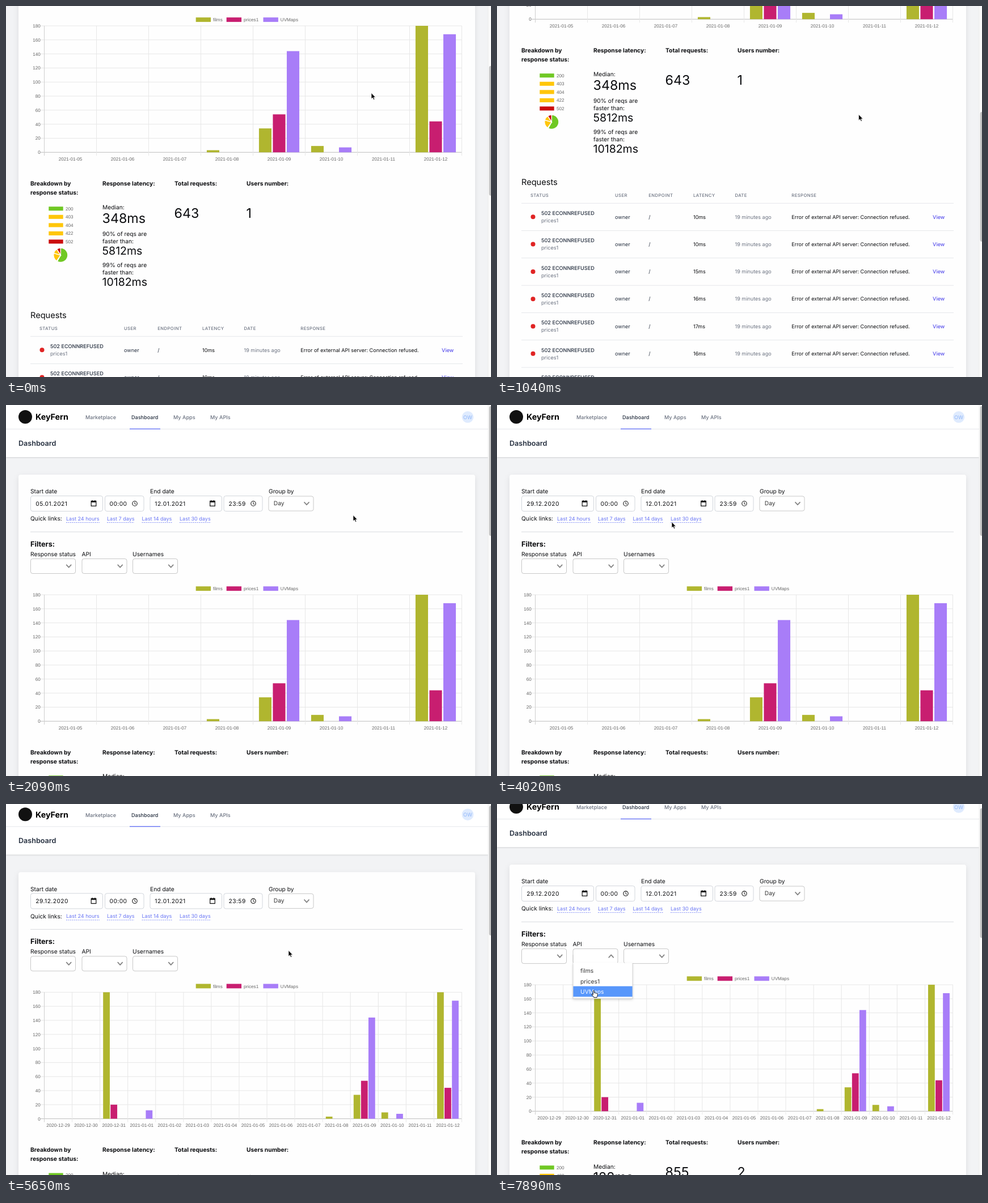
These frames come from a looping animation (855 px wide and 655 px high, 8000 ms). An HTML page:

```html
<!DOCTYPE html>
<html lang="en">
<head>
<meta charset="utf-8">
<title>Dashboard</title>
<style>
html, body { margin: 0; width: 100%; height: 100%; overflow: hidden; background: #f2f3f5; }
svg { display: block; width: 855px; height: 655px; }
text { font-family: Inter, "Open Sans", sans-serif; white-space: pre; text-rendering: geometricPrecision; }
.chart text { font-family: "Liberation Sans", Arial, sans-serif; }
.bar { filter: drop-shadow(0 1px 1px rgba(0,0,0,.14)); }
.card { filter: drop-shadow(0 3px 5px rgba(0,0,0,.09)); }
.menu { filter: drop-shadow(0 2px 2px rgba(0,0,0,.15)); }
</style>
</head>
<body>
<svg id="stage" viewBox="0 0 855 655"></svg>
<script>
const TICK = 148.4, LOOP = 8000;
const INK = '#0b0c0f', DARK = '#252f3f', GRAY = '#6b7280', LINK = '#6875f5', LINE = '#e5e7eb';
const COLORS = ['#b0b62f', '#c81e70', '#a87df8'];
const NAMES = ['films', 'prices1', 'UVMaps'];
const BASE = 10.25, SMALL = 9.05, TINY = 8.15, BIG = 23.3, MID = 19.5;

// y is the middle of the capitals
function text(x, y, s, size = BASE, fill = INK, weight = 400, extra = '') {
  return `<text x="${x}" y="${(y + size * .364).toFixed(2)}" font-size="${size}" fill="${fill}" font-weight="${weight}" ${extra}>${s}</text>`;
}
function rect(x, y, w, h, fill, extra = '') {
  return `<rect x="${x}" y="${y}" width="${w}" height="${h}" fill="${fill}" ${extra}/>`;
}
function line(x1, y1, x2, y2, stroke = LINE, extra = '') {
  return `<path d="M${x1} ${y1}L${x2} ${y2}" stroke="${stroke}" fill="none" ${extra}/>`;
}
function field(x, y, w, h, stroke = '#d2d6dc') {
  return rect(x, y, w, h, '#fff', `rx="3.5" stroke="${stroke}"`);
}
function chevron(x, y, id = '') {
  return `<path ${id} transform="translate(${x} ${y})" d="M-4-2.2L0 2.2L4-2.2" fill="none" stroke="#868686" stroke-width="1.8" stroke-linecap="round" stroke-linejoin="round"/>`;
}
function calendar(x, y) {
  return `<g transform="translate(${x} ${y})"><path d="M-4.3-3.8H4.3V4.8H-4.3Z" fill="none" stroke="#111" stroke-width="1.2"/>`
    + rect(-4.5, -4.2, 9, 2.6, '#111') + rect(-3, -5.4, 1.3, 2, '#111') + rect(1.7, -5.4, 1.3, 2, '#111') + '</g>';
}
function clock(x, y) {
  return `<g transform="translate(${x} ${y})" fill="none" stroke="#111"><circle r="4.2" stroke-width="1.1"/><path d="M0-2.6V.3L2 1.5"/></g>`;
}

function header() {
  const nav = [[140, 'Marketplace'], [221, 'Dashboard'], [295, 'My Apps'], [360, 'My APIs']];
  return rect(0, -1, 850, 93, '#fff', 'class="bar"')
    + line(0, 42.5, 850, 42.5)
    + '<circle cx="34" cy="21" r="12" fill="#111"/>'
    + text(52, 21, 'KeyFern', 14.3, '#000', 700)
    + nav.map(([x, s]) => text(x, 22, s, 9.08, s === 'Dashboard' ? DARK : GRAY, 500)).join('')
    + rect(218, 41.6, 54, 1.4, LINK)
    + '<circle cx="814" cy="21.3" r="10.3" fill="#dfebfe"/>'
    + text(814, 21.5, 'OW', SMALL, '#8fb5f8', 400, 'text-anchor="middle"')
    + text(22, 67.5, 'Dashboard', 12.6, DARK, 600);
}

function form() {
  const pick = 'rgba(60,60,60,.28)';
  const links = [[106, 165, '24 hours'], [178, 226, '7 days'], [239.5, 293, '14 days'], [306, 361, '30 days']];
  const filters = [[43, 'Response status'], [133.5, 'API'], [223, 'Usernames']];
  const value = (x, s, id = '') => text(x, 174, s, BASE, INK, 400, 'letter-spacing=".44" ' + id);
  return text(43, 152.5, 'Start date') + text(254, 152.5, 'End date') + text(463, 152.5, 'Group by')
    + field(43.5, 160.5, 127, 27) + field(174.5, 160.5, 68.5, 27)
    + field(254, 160.5, 126.5, 27) + field(384, 160.5, 68, 27)
    + value(52.3, '', 'id="start"') + value(182.5, '00:00') + value(262.3, '12.01.2021') + value(392.5, '23:59')
    + calendar(154.5, 173.5) + clock(227, 174) + calendar(364, 173.5) + clock(436, 174)
    + field(463, 161, 79, 26, pick) + text(471.8, 173, 'Day', BASE, '#333') + chevron(530, 174)
    + text(43, 200.5, 'Quick links:')
    + links.map(([a, b, s]) => text(a, 200.8, 'Last ' + s, SMALL, LINK)
      + line(a, 207.5, b, 207.5, LINK, 'stroke-dasharray="2 1.4" stroke-width=".8"')).join('')
    + line(43, 224, 805, 224, '#d8dade')
    + text(43, 245, 'Filters:', 12.7, INK, 700)
    + filters.map(([x, s], i) => text(x, 263, s) + field(x + .5, 271.5, 79, 26, pick)
      + chevron(x + 67.7, 284.5, i === 1 ? 'id="chev"' : '')).join('');
}

const LEFT = 67.5, WIDE = 736, TOP = 335, ZERO = 558.3;
const yOf = v => ZERO - v * (ZERO - TOP) / 180;
const week = { first: Date.UTC(2021, 0, 5), n: 8,
  data: { 3: [3, 0, 0], 4: [34, 54, 144], 5: [9, 0, 7], 7: [180, 44, 168] } };
const fortnight = { first: Date.UTC(2020, 11, 29), n: 15,
  data: { 2: [180, 20, 0], 3: [0, 0, 12], 10: [3, 0, 0], 11: [34, 54, 144], 12: [9, 0, 7], 14: [180, 44, 168] } };

function axes(set, id) {
  const step = WIDE / set.n;
  let out = '';
  for (let i = 0; i <= set.n; i++) {
    const x = LEFT + i * step;
    out += line(x, TOP, x, ZERO + 6, i ? '#e7e7e7' : '#cfcfcf');
    if (i < set.n) {
      const day = new Date(set.first + i * 864e5).toISOString().slice(0, 10);
      out += text((x + step / 2).toFixed(2), 569.8, day, TINY, '#666', 400, 'text-anchor="middle"');
    }
  }
  return `<g id="${id}">${out}</g>`;
}
function chart() {
  let out = '';
  [334.7, 388.7, 453.5].forEach((x, i) => {
    out += rect(x, 320.2, 26.4, 7.9, COLORS[i]) + text(x + 30.3, 324.2, NAMES[i], TINY, '#666');
  });
  for (let v = 0; v <= 180; v += 20) {
    out += line(61, yOf(v), LEFT + WIDE, yOf(v), v ? '#e7e7e7' : '#bdbdbd')
      + text(60.7, yOf(v), v, TINY, '#666', 400, 'text-anchor="end"');
  }
  return `<g class="chart">${out}${axes(week, 'week')}${axes(fortnight, 'fortnight')}<g id="bars"></g></g>`;
}

function barAt(set, i, s) {
  const step = WIDE / set.n, slot = step * .8 / 3;
  return { x: LEFT + (i + .5) * step + (s - 1) * slot, w: slot * .9, v: (set.data[i] || [0, 0, 0])[s] };
}
function bars(p) {
  let out = '';
  for (let i = 0; i < 15; i++) for (let s = 0; s < 3; s++) {
    const b = barAt(fortnight, i, s);
    const a = i < 8 ? barAt(week, i, s) : { ...b, v: 0 };
    const mix = key => a[key] + (b[key] - a[key]) * p;
    const v = mix('v'), w = mix('w');
    if (v > .01) out += rect((mix('x') - w / 2).toFixed(2), yOf(v).toFixed(2), w.toFixed(2), (ZERO - yOf(v)).toFixed(2), COLORS[s]);
  }
  return out;
}

function pie(cx, cy, r) {
  const parts = [[.58, '#70c824'], [.015, '#ffc60a'], [.2, '#ffc60a'], [.115, '#ffc60a'], [.09, '#cb0d0d']];
  let at = 0;
  const point = f => `${(cx + r * Math.sin(f * 2 * Math.PI)).toFixed(2)} ${(cy - r * Math.cos(f * 2 * Math.PI)).toFixed(2)}`;
  return parts.map(([f, c]) => {
    const d = `M${cx} ${cy}L${point(at)}A${r} ${r} 0 ${f > .5 ? 1 : 0} 1 ${point(at += f)}Z`;
    return `<path d="${d}" fill="${c}" stroke="#fff" stroke-width="1.3"/>`;
  }).join('');
}
function stats() {
  const codes = [200, 403, 404, 422, 502];
  const heads = [[43, 613, 'Breakdown by'], [43, 629, 'response status:'], [170, 613, 'Response latency:'],
    [297, 613, 'Total requests:'], [424, 613, 'Users number:']];
  return heads.map(([x, y, s]) => text(x, y, s, 10.3, INK, 700)).join('')
    + '<g class="chart">' + codes.map((c, i) => {
      const y = 657.8 + i * 14.55;
      return rect(75.3, y - 3.6, 25.4, 7.1, i ? i < 4 ? '#ffc60a' : '#cb0d0d' : '#70c824')
        + text(105, y, c, TINY, '#666', 400, i === 1 ? 'id="code"' : '');
    }).join('') + '</g>' + pie(96.3, 739.8, 12.6)
    + text(170, 655.7, 'Median:') + text(169.5, 674.3, '', BIG, INK, 400, 'id="median"')
    + text(170, 702, '90% of reqs are') + text(170, 715.2, 'faster than:') + text(169.5, 731.4, '5812ms', MID)
    + text(170, 757.5, '99% of reqs are') + text(170, 770.7, 'faster than:') + text(169.5, 786.8, '10182ms', MID)
    + text(296.5, 665.7, '', BIG, INK, 400, 'id="total"') + text(423.5, 665.7, '', BIG, INK, 400, 'id="users"');
}

function table() {
  const cols = [[59, 'STATUS'], [208, 'USER'], [267.3, 'ENDPOINT'], [346, 'LATENCY'], [419.5, 'DATE'], [519.3, 'RESPONSE']];
  let out = text(43, 845.3, 'Requests', 14.6)
    + cols.map(([x, s]) => text(x, 869.6, s, 7.73, GRAY, 500, 'letter-spacing=".39"')).join('')
    + line(43, 883.3, 805, 883.3);
  [10, 10, 15, 16, 17, 16, 15].forEach((ms, i) => {
    const y = 907.3 + i * 48.3;
    out += `<circle cx="63.5" cy="${y}" r="4" fill="#e02424"/>`
      + text(78, y - 6.5, '502 ECONNREFUSED', 9.12, DARK, 500) + text(78, y + 6.6, NAMES[1], SMALL, GRAY)
      + text(208, y, 'owner', SMALL, DARK) + text(267.3, y, '/', SMALL, DARK)
      + text(346, y, ms + 'ms', SMALL) + text(419.5, y, '19 minutes ago', SMALL, GRAY)
      + text(519.3, y, 'Error of external API server: Connection refused.', SMALL)
      + text(768, y, 'View', SMALL, '#5850ec', 500)
      + line(43, y + 24.3, 805, y + 24.3);
  });
  return out;
}
function menu(active) {
  return rect(134, 296.5, 105, 63, '#fff', 'class="menu"')
    + `<path d="M134 282V359.5H239V297" fill="none" stroke="#c9c9c9" stroke-width=".8"/>`
    + rect(134.5, 296, 78, 3, '#fff')
    + NAMES.map((s, i) => (i === active ? rect(134.4, 300.8 + i * 18.4, 104.2, 18.6, '#5897fb') : '')
      + text(147, 310.3 + i * 18.4, s, BASE, i === active ? '#fff' : '#333')).join('');
}

const stage = document.getElementById('stage');
stage.innerHTML = rect(0, 0, 855, 655, '#f2f3f5')
  + '<g id="page">' + header() + rect(22, 123, 805, 1700, '#fefefe', 'rx="4" class="card"')
  + form() + chart() + stats() + table() + '<g id="menu"></g></g>'
  + rect(850, 0, 5, 655, '#fafafa') + line(850, 0, 850, 655, '#e9e9e9', 'stroke-width=".8"')
  + rect(851.7, 0, 6, 229, '#c1c1c1', 'rx="3" id="thumb"')
  + '<g id="cursor" stroke-linejoin="round">'
  + '<path id="arrow" d="M0-.4V10L2.4 7.8L4.1 11.5L5.8 10.8L4.2 7.2H7.4Z" fill="#000" stroke="#fff" stroke-width=".7"/>'
  + '<path id="hand" d="M-1.7 .8Q-1.7-.6-.6-.6Q.5-.6.5.8V3.6Q1.6 2.8 2.5 3.9Q3.7 3.3 4.5 4.4Q6.2 4 6.2 5.8V8Q6.2 9.3 5.2 10.4V11.6H-.4V10.6L-3.9 6.9Q-4.4 5.8-3.3 5.5L-1.7 6.6Z" fill="#fff" stroke="#000" stroke-width=".9"/></g>';
const el = id => document.getElementById(id);

// [tick, scroll]
const scrolls = [[0, 300], [1, 345], [2, 450], [3, 515], [4, 535], [7, 535], [8, 500], [9, 390], [10, 230],
  [11, 135], [12, 135], [13, 30], [14, 0], [36, 0], [37, .7], [38, 2.65], [39, 9], [40, 14], [41, 15.9]];
// [tick, x, y]
const moves = [[0, 644, 154], [4, 641, 178], [6, 641, 178], [7, 637.6, 192], [12, 637.6, 192], [14, 612, 195],
  [15, 585, 196], [18, 340, 201], [19, 275, 201], [20, 253, 200], [21, 246, 200], [24, 246, 200], [25, 250, 203],
  [27, 308, 207], [29, 425, 230], [30, 470, 242], [31, 491, 255], [32, 497, 258], [34, 498, 259], [39, 498, 259],
  [40, 470, 261], [42, 270, 268], [43, 195, 270], [44, 174, 270], [46, 174, 270], [47, 174, 272], [52, 171, 323], [53, 171, 330]];

function sample(keys, k, col) {
  const i = keys.findIndex(r => r[0] >= k);
  if (i < 0) return keys[keys.length - 1][col];
  if (i === 0) return keys[0][col];
  const a = keys[i - 1], b = keys[i];
  return a[col] + (b[col] - a[col]) * (k - a[0]) / (b[0] - a[0]);
}
const show = (id, on) => el(id).setAttribute('display', on ? 'inline' : 'none');
const place = (id, x, y) => el(id).setAttribute('transform', `translate(${x} ${y})`);

function draw(k) {
  const scroll = sample(scrolls, k, 1), x = sample(moves, k, 1), y = sample(moves, k, 2);
  place('page', 0, -scroll);
  place('thumb', 0, 2 + scroll * .346);
  place('cursor', x, y);
  const hand = (k >= 18 && k <= 25) || k >= 43;
  show('hand', hand);
  show('arrow', !hand);

  // bars ease out over one second
  const t = Math.min(1, Math.max(0, (k * 148.7 - 4061) / 1000));
  const fresh = t > 0;
  el('bars').innerHTML = bars(1 - (1 - t) ** 4);
  show('week', !fresh);
  show('fortnight', fresh);
  el('start').textContent = k < 24 ? '05.01.2021' : '29.12.2020';
  el('median').textContent = fresh ? '122ms' : '348ms';
  el('total').textContent = fresh ? '855' : '643';
  el('users').textContent = fresh ? '2' : '1';
  el('code').textContent = fresh ? '400' : '403';

  const open = k >= 47, pageY = y + scroll;
  el('menu').innerHTML = open ? menu(pageY < 319 ? 0 : pageY < 337.5 ? 1 : 2) : '';
  el('chev').setAttribute('transform', `translate(201.2 284.5) scale(1 ${open ? -1 : 1})`);
}

let last = -1;
const began = performance.now();
function frame() {
  const k = Math.floor(((performance.now() - began) % LOOP) / TICK);
  if (k !== last) draw(last = k);
  requestAnimationFrame(frame);
}
frame();
</script>
</body>
</html>
```
